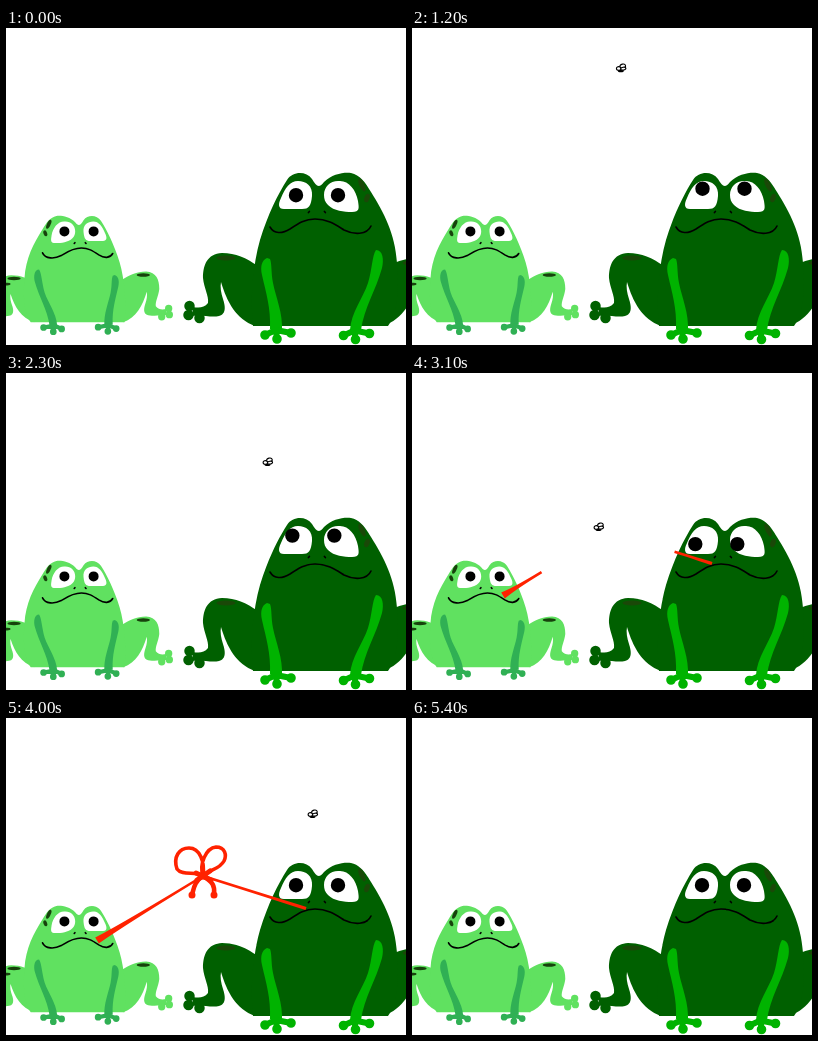
Animation of 400x317 px, one loop 6.3 s. Source, as an HTML page:

```html
<!DOCTYPE html>
<html lang="en">
<head>
<meta charset="utf-8">
<title>Two frogs and a fly</title>
<style>
  html, body { margin: 0; width: 100%; height: 100%; overflow: hidden; background: #fff; }
  svg { display: block; width: 100%; height: 100%; }
  .big { --skin: #006000; --arm: #00b300; --spot: #1a4808; }
  .small { --skin: #60e160; --arm: #30b054; --spot: #17420c; }
  .skin { fill: var(--skin); }
  .arm { fill: var(--arm); }
  .spot { fill: var(--spot); }
  .eye { fill: #fff; }
  .toes, .fingers, .bow, .line { fill: none; stroke-linecap: round; stroke-linejoin: round; }
  .toes { stroke: var(--skin); stroke-width: 10.5; }
  .fingers { stroke: var(--arm); stroke-width: 6; }
  .tips { stroke-width: 9.6; }
  .line { stroke: #000; stroke-width: 1.6; vector-effect: non-scaling-stroke; }
  .tongue { fill: #ff2200; }
  .bow { stroke: #ff2200; stroke-width: 3.6; }
  .wing { fill: #fff; stroke: #000; stroke-width: 1.1; }
</style>
</head>
<body>
<svg viewBox="0 0 400 317" preserveAspectRatio="none">
  <defs>
    <g id="leg">
      <path class="skin" d="M252 238C240 230 230 225 216 225C201 226 197 237 197 250C198 260 203 268 202 275C198 280 193 280 187 279L186 288C195 286 205 290 213 288C221 286 219 277 217 271C215 265 214 259 215 254C221 274 230 291 249 298Z"/>
      <path class="toes" d="M183.5 278h0M182.5 287h0M193.5 290h0"/>
      <ellipse class="spot" cx="220" cy="230" rx="9.5" ry="2.6"/>
    </g>
    <g id="hand" class="fingers">
      <path d="M-11 5L0 0L1 9M0 0L15 3"/>
      <path class="tips" d="M-11 5h0M1 9h0M15 3h0"/>
    </g>
    <g id="frog">
      <use href="#leg"/>
      <use href="#leg" transform="matrix(-1 0 0 .926 626 22)"/>
      <path class="skin" d="M247 298C244 270 247 236 254 212C262 186 272 166 281 152C287 143 300 143 306 151C310 158 313 161 318 154C326 146 338 144 345 145C354 147 359 154 365 164C378 185 389 205 391 235C393 260 392 285 382 298Z"/>
      <g class="spot">
        <ellipse cx="416" cy="243" rx="5" ry="2"/>
        <ellipse rx="2.6" ry="7" transform="translate(356 157) rotate(-25)"/>
        <ellipse rx="2.6" ry="4.4" transform="translate(361 170) rotate(20)"/>
      </g>
      <path class="arm" d="M261 230C256 232 254 238 256 247C260 265 265 280 264 301L276 303C277 285 270 270 267 255C265 245 266 236 264 231Z"/>
      <path class="arm" d="M370 222C377 222 378 232 376 240C370 262 358 280 355 302L344 302C345 285 357 270 362 255C366 242 366 228 370 222Z"/>
      <use href="#hand" x="270" y="302"/>
      <use href="#hand" x="348.5" y="302.5"/>
      <path class="eye" d="M292 153C300 153 307 158 306 168C305 178 303 181 296 181L278 181C272 181 272 176 275 170C279 160 284 153 292 153Z"/>
      <path class="eye" d="M318 167C318 158 325 152 334 153C343 153 350 162 352 173C353 180 354 184 346 184C338 184 328 183 322 177C319 174 318 171 318 167Z"/>
      <path class="line" d="M302.4 184.6l1-1.2M318.4 183.4l1 1.2"/>
      <path class="line" d="M264 199C268 206 276 206 284 201C293 195 299 191 309 191C322 191 330 197 338 202C348 207 361 207 365 198"/>
    </g>
    <path id="pupils" d="M290 167.2h0M332 167.2h0" stroke="#000" stroke-width="14.4" stroke-linecap="round"/>
  </defs>

  <g class="small" transform="matrix(-.695 0 0 .695 290.2 87.2)">
    <use href="#frog"/>
    <use href="#pupils" x="1.5"/>
  </g>
  <g class="big">
    <use href="#frog"/>
    <use id="gaze" href="#pupils"/>
  </g>

  <path id="tongueL" class="tongue"/>
  <path id="tongueR" class="tongue"/>
  <g id="bow" class="bow">
    <path d="M197 158C190 153 176 158 171 151C167 139 173 130 183 130C194 130 199 144 197 158C193 146 200 130 210 129C219 129 221 137 218 143C213 152 204 151 197 158"/>
    <path stroke-width="4.5" d="M186 177C188 170 188 164 197 158C207 164 209 168 208 176"/>
    <path stroke-width="7" d="M186 177h0M208 177h0M196 158h2"/>
    <path stroke-width="5" d="M190 155L205 162M204 153L191 162"/>
  </g>

  <g id="fly">
    <ellipse cx="-.5" cy="2.6" rx="3" ry="1.5"/>
    <ellipse class="wing" cx="-2.6" cy=".4" rx="2.3" ry="1.8"/>
    <ellipse class="wing" cx="1.8" cy="-1.6" rx="2.8" ry="2" transform="rotate(-12)"/>
    <ellipse class="wing" cx="1.8" cy="1" rx="2.6" ry="1.4" transform="rotate(-12)"/>
  </g>
</svg>

<script>
  const LOOP = 6300, STEP = 100;
  const KNOT = [197, 158];
  const $ = id => document.getElementById(id);

  // Turning points of the flight: time, x, y
  const flight = [
    [100, 381, 19], [700, 274, 68], [1400, 196, 25], [1700, 238, 6], [2300, 262, 89],
    [2800, 185, 122], [3100, 187, 154], [4000, 307, 96], [4300, 391, 60]
  ];

  // Progress from 0 to 1 between two times
  const ramp = (t, from, to) => Math.max(0, Math.min(1, (t - from) / (to - from)));
  const show = (el, on) => el.setAttribute('visibility', on ? 'visible' : 'hidden');
  const move = (el, x, y) => el.setAttribute('transform', `translate(${x} ${y})`);

  // Smooth curve through the turning points
  function flyAt(t) {
    const last = flight.length - 1;
    const i = Math.max(0, Math.min(last - 1, flight.findLastIndex(p => p[0] <= t)));
    const p = flight[i], q = flight[i + 1];
    const u = ramp(t, p[0], q[0]);
    const slope = (j, n) => {
      const a = flight[Math.max(0, j - 1)], b = flight[Math.min(last, j + 1)];
      return (b[n] - a[n]) / (b[0] - a[0]) * (q[0] - p[0]);
    };
    return [1, 2].map(n => {
      const d = q[n] - p[n], m0 = slope(i, n), m1 = slope(i + 1, n);
      return p[n] + u * (m0 + u * (3 * d - 2 * m0 - m1 + u * (m0 + m1 - 2 * d)));
    });
  }

  // Look up, sink to the left, then back to rest
  function gazeAt(t) {
    const up = ramp(t, 100, 700), left = ramp(t, 1200, 3100), rest = 1 - ramp(t, 3500, 3800);
    const down = ramp(t, 1700, 3100) ** 2;
    return [(0.5 * up - 7.2 * left) * rest, (10.4 * down - 6.5 * up) * rest];
  }

  // A thin strip that flares out at the mouth
  function drawTongue(el, [x, y], flare, width, amount) {
    const dx = KNOT[0] - x, dy = KNOT[1] - y, len = Math.hypot(dx, dy);
    const at = (u, w) => `${x + dx * u - dy / len * w / 2} ${y + dy * u + dx / len * w / 2}`;
    const neck = amount * 0.3;
    el.setAttribute('d', `M${at(0, flare)}Q${at(neck, width)} ${at(amount, width)}`
      + `L${at(amount, -width)}Q${at(neck, -width)} ${at(0, -flare)}Z`);
    show(el, amount > 0);
  }

  function render(t) {
    move($('gaze'), ...gazeAt(t));
    move($('fly'), ...flyAt(t));
    show($('fly'), t >= 100 && t < 4400);

    const reach = ramp(t, 2900, 3450) - ramp(t, 4900, 5400);
    drawTongue($('tongueL'), [91, 222.5], 7, 2.6, reach);
    drawTongue($('tongueR'), [300, 190.5], 3.4, 2.6, reach);
    show($('bow'), t >= 3500 && t < 5000);
  }

  const start = performance.now();
  function tick() {
    const t = (performance.now() - start) % LOOP;
    render(Math.floor(t / STEP) * STEP);
    requestAnimationFrame(tick);
  }
  tick();
</script>
</body>
</html>
```
